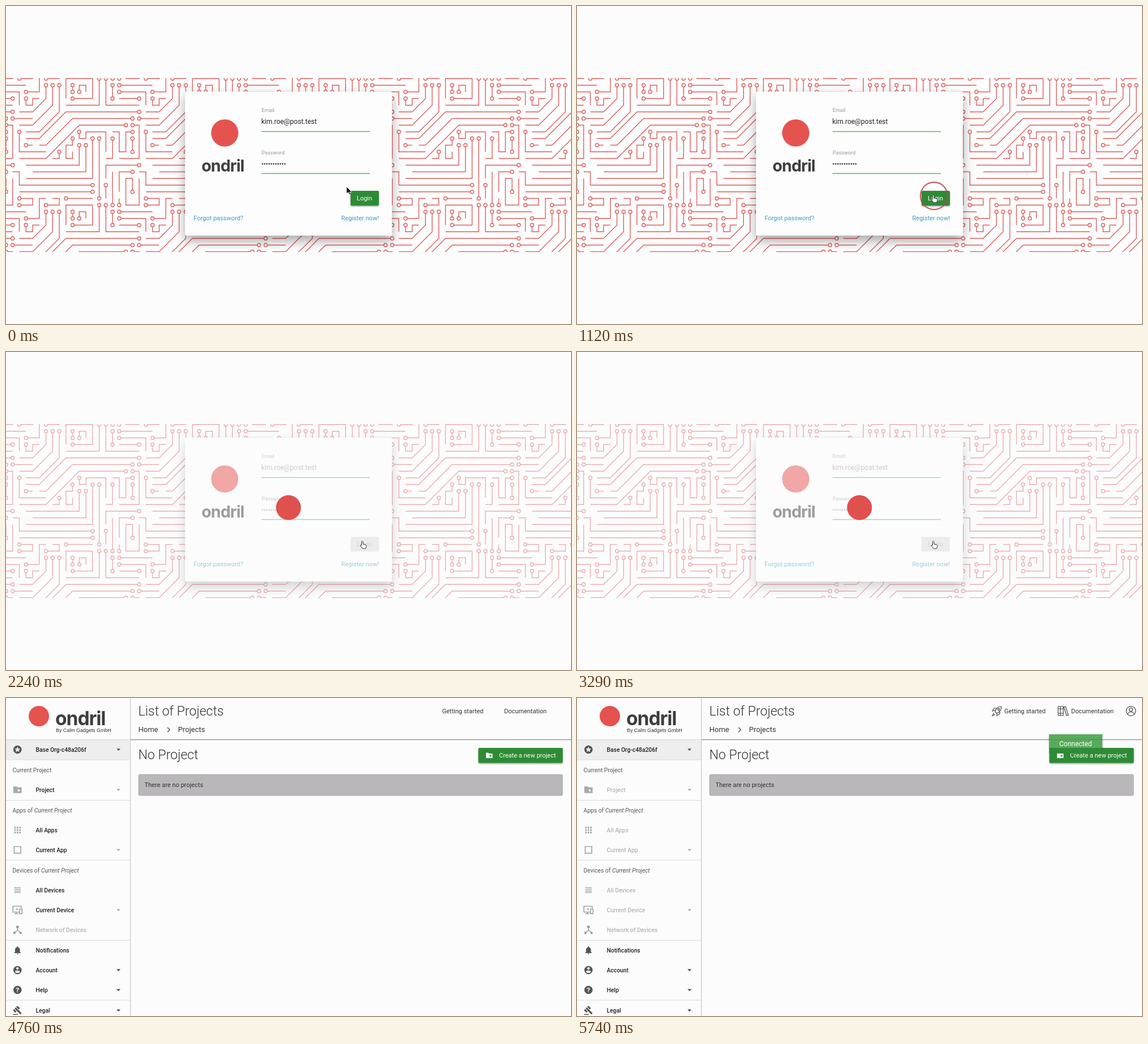
Write an HTML page that moves like this. It is 997 px wide and 561 px high and loops after 5880 ms.

```html
<!DOCTYPE html>
<html lang="en">
<head>
<meta charset="utf-8">
<title>Login and project list</title>
<style>
html, body { margin: 0; width: 100%; height: 100%; overflow: hidden; background: #fcfcfd; }
svg { display: block; width: 100%; height: 100%; }
text { font-family: Roboto, sans-serif; font-size: 11px; fill: #333; }
.word { font-family: Inter, sans-serif; font-size: 28.5px; font-weight: 700; fill: #3d3d3f; letter-spacing: -.03em; }
.word.big { font-size: 33.5px; }
.label { font-size: 9.2px; fill: #999; }
.link { fill: #3f9ac4; }
.title { font-size: 23px; font-weight: 300; }
.crumb { font-size: 13px; }
.menu { font-size: 10.3px; font-weight: 500; fill: #222; }
.section { font-size: 10.3px; fill: #555; }
.off { fill: #b5b5b5; }

.login, .dash, .cursor, .arrow, .hand, .ring, .veil, .field, .enabled, .disabled,
.fade, .early, .late, .toast { animation: 5880ms linear infinite both; }
.login { animation-name: login; }
.dash { animation-name: dash; }
.cursor { animation-name: move; }
.arrow { animation-name: arrow; }
.hand { animation-name: hand; }
.ring { animation-name: ring; }
.veil { animation-name: veil; }
.field { animation-name: field; }
.enabled { animation-name: enabled; }
.disabled { animation-name: disabled; }
.fade { animation-name: fade; }
.early { animation-name: early; }
.late { animation-name: late; }
.toast { animation-name: toast; }

@keyframes login { 0%, 80.94% { visibility: visible } 80.95%, 100% { visibility: hidden } }
@keyframes dash { 0%, 80.94% { visibility: hidden } 80.95%, 100% { visibility: visible } }
@keyframes move {
  0% { transform: translate(601px, 320px); animation-timing-function: ease-in-out }
  14.29%, 100% { transform: translate(629px, 334px) }
}
@keyframes arrow { 0%, 6.2% { opacity: 1 } 6.21%, 100% { opacity: 0 } }
@keyframes hand { 0%, 6.2% { opacity: 0 } 6.21%, 100% { opacity: 1 } }
@keyframes ring {
  0%, 16.6% { r: 12px; opacity: 0 }
  16.67% { r: 12px; opacity: .9 }
  19.05% { r: 24px; opacity: .85 }
  21.43%, 100% { r: 29px; opacity: 0 }
}
@keyframes field { 0%, 23.2% { fill: #222 } 25%, 100% { fill: #999 } }
@keyframes enabled { 0%, 23.2% { opacity: 1 } 25%, 100% { opacity: 0 } }
@keyframes disabled { 0%, 23.2% { opacity: 0 } 25%, 100% { opacity: 1 } }
@keyframes veil { 0%, 34% { opacity: 0 } 37.5%, 100% { opacity: 1 } }
@keyframes fade { 0%, 82.14% { fill: #222 } 86.9%, 100% { fill: #b5b5b5 } }
@keyframes early { 0%, 91.66% { opacity: 1 } 91.67%, 100% { opacity: 0 } }
@keyframes late { 0%, 91.66% { opacity: 0 } 91.67%, 100% { opacity: 1 } }
@keyframes toast { 0%, 95.2% { opacity: 0 } 97.62%, 100% { opacity: .88 } }
</style>
</head>
<body>
<svg viewBox="0 0 997 561" preserveAspectRatio="none">
  <defs>
    <clipPath id="band"><rect y="127" width="997" height="307"/></clipPath>
    <marker id="pad" viewBox="-5 -5 10 10" markerWidth="10" markerHeight="10" markerUnits="userSpaceOnUse"
      style="overflow:visible"><circle r="3" fill="#fefdfd" stroke="#d9605f" stroke-width="1.4"/></marker>
    <filter id="cardShadow" x="-20%" y="-20%" width="140%" height="150%">
      <feDropShadow dx="0" dy="9" stdDeviation="10" flood-opacity=".34"/>
    </filter>
    <filter id="soft" x="-10%" y="-20%" width="120%" height="160%">
      <feDropShadow dx="0" dy="1.5" stdDeviation="1.2" flood-opacity=".4"/>
    </filter>
    <g id="tile" fill="none" stroke="#d9605f" stroke-width="1.4"></g>
  </defs>

  <g class="login">
    <rect width="997" height="561" fill="#fcfcfd"/>
    <g clip-path="url(#band)"><rect y="127" width="997" height="307" fill="#fefdfd"/><g id="board"></g></g>
    <rect x="316" y="151" width="365" height="254" rx="2" fill="#fdfdfd" filter="url(#cardShadow)"/>
    <circle cx="386" cy="224" r="24" fill="#e5534f"/>
    <text class="word" x="345" y="292">ondril</text>
    <text class="label" x="451" y="187">Email</text>
    <text class="field" x="450.5" y="208" style="font-size:12px">kim.roe@post.test</text>
    <text class="label" x="451" y="261.5">Password</text>
    <g id="dots" class="field"></g>
    <path d="M451 221.5h191M451 295.5h191" stroke="#4fbd5a" stroke-width="1.7"/>
    <g class="disabled">
      <rect x="608" y="326" width="50" height="26" rx="2" fill="#dcdcdc"/>
      <text x="619" y="343" style="fill:#aaa">Login</text>
    </g>
    <g class="enabled">
      <rect x="608" y="326" width="50" height="26" rx="2" fill="#2e8b35" filter="url(#soft)"/>
      <text x="619" y="343" style="fill:#fff">Login</text>
    </g>
    <text class="link" x="331" y="378">Forgot password?</text>
    <text class="link" x="658" y="378" text-anchor="end">Register now!</text>
    <g class="veil">
      <rect width="997" height="561" fill="#fcfcfd" opacity=".5"/>
      <circle cx="498.5" cy="274.5" r="22" fill="#e0504e"/>
    </g>
    <circle class="ring" cx="630" cy="335" r="24" fill="none" stroke="#b9474a" stroke-width="2.2"/>
    <g class="cursor">
      <path class="arrow" d="M0-1V11L3 8.5 5 13 7 12 5 8H9Z" fill="#111" stroke="#fff" stroke-width=".6"/>
      <path class="hand" d="M-1.5 1c0-2 2.5-2 2.5 0v4l4 .8c1.6.4 2 1.2 1.7 3l-.9 4H.2L-3.5 8c-.8-1.5.6-2 2-.7z"
        fill="#fff" stroke="#333" stroke-width="1"/>
    </g>
  </g>

  <g class="dash">
    <rect width="997" height="561" fill="#fcfcfd"/>
    <rect y="73" width="219" height="36" fill="#eeeeef"/>
    <path d="M0 73.5H219M0 109H219M0 180.5H219M0 286H219M0 427.5H219M0 533H219" stroke="#dadada"/>
    <path d="M219.5 0V561" stroke="#d0d0d0" stroke-width="1.5"/>
    <path d="M220 73.5H997" stroke="#999" stroke-width="1.6"/>
    <circle cx="58" cy="32" r="18" fill="#e5534f"/>
    <text class="word big" x="87" y="48">ondril</text>
    <text x="88" y="59.5" style="font:8.9px 'Liberation Sans',sans-serif">By Calm Gadgets GmbH</text>
    <g id="menu"></g>
    <text class="section" x="11.5" y="131">Current Project</text>
    <text class="section" x="11.5" y="202">Apps of <tspan font-style="italic">Current Project</tspan></text>
    <text class="section" x="11.5" y="307.5">Devices of <tspan font-style="italic">Current Project</tspan></text>

    <text class="title" x="233.5" y="31">List of Projects</text>
    <text class="crumb" x="233.5" y="59.5">Home</text>
    <path d="M285 52l4 4-4 4" fill="none" stroke="#444" stroke-width="1.3"/>
    <text class="crumb" x="303.5" y="59.5">Projects</text>
    <g class="early">
      <text x="769.5" y="27">Getting started</text>
      <text x="879" y="27">Documentation</text>
    </g>
    <g class="late">
      <g fill="none" stroke="#444" stroke-width="1.2">
        <path d="M738 24c1-6 5-9 11-9 0 6-3 10-9 12zM738 22l-5 1 3-5 4 0M741 26l0 5 5-3 0-4M736 26l-3 5 5-2"/>
        <circle cx="744" cy="20" r="1.7"/>
        <path d="M849 15h4v16h-4zM853 15h5v16h-5zM859 16l3-1 5 15-3 1zM849 19h9M849 27h9"/>
        <circle cx="977.5" cy="23" r="8.3"/><circle cx="977.5" cy="20.5" r="3"/>
        <path d="M971.5 28.5c2-5 10-5 12 0"/>
      </g>
      <text x="754" y="27">Getting started</text>
      <text x="872" y="27">Documentation</text>
    </g>
    <text class="title" x="233.5" y="108">No Project</text>
    <rect x="833.5" y="88" width="149" height="26.5" rx="2" fill="#2e8b35" filter="url(#soft)"/>
    <path d="M847 96.5h4l1.5 1.5h6v8h-11.5z" fill="#fff"/>
    <path d="M855 99.8v4M853 101.8h4" stroke="#2e8b35" stroke-width="1.2"/>
    <text x="870" y="104.5" style="fill:#fff">Create a new project</text>
    <rect x="234" y="135" width="748" height="37" rx="2" fill="#b9b7b9" stroke="#aaa8aa"/>
    <text x="244.5" y="157">There are no projects</text>
    <g class="toast">
      <path d="M833 64h94v24h-94z" fill="#43a047" filter="url(#soft)"/>
      <path d="M833 88h94v10h-94z" fill="#2f8d37"/>
      <text x="851" y="84.5" style="font-size:12px;fill:#fff">Connected</text>
    </g>
  </g>
</svg>
<script>
const $ = id => document.getElementById(id);
const span = n => [...Array(n).keys()];

// The main circuit traces on a wrapping grid; each begins at a round pad.
const size = 19, pitch = 11.75, side = size * pitch;
const traces = `M6 1v2l-2 2h-2|M7 1v3l-3 3h-2|M8 1v4l-3 3h-2|M10 3h3v-3h-4v3|M11 2v-1h1v1
|M20 5h-11l-4 4h-2|M19 6h-9l-4 4h-1|M18 7h-7l-5 5h-4|M11 10v3h-8|M12 10v4h-8|M13 9v6h-10
|M13 16h-11v-2h-1|M13 17h-11|M19 17v-2h-1v4h2v-4|M1 13h-5v2|M0 14h-2v3
|M17 2h4v2|M17 1h5|M20 3h-3|M3 2h2v-3h1`.split('|').map(trace => trace.trim());

const used = new Set();
const key = (x, y) => (x + size) % size + ',' + (y + size) % size;
const drawTrace = (d, endPad) => {
  const path = d.replace(/-?\d+/g, n => n * pitch);
  return `<path d="${path}" marker-start="url(#pad)"${endPad ? ' marker-end="url(#pad)"' : ''}/>`;
};

function occupy(trace) {
  let x = 0, y = 0;
  for (const [, command, a, b] of trace.matchAll(/([Mhvl])(-?\d+)(?: (\d+))?/g)) {
    const dx = command === 'v' ? 0 : +a;
    const dy = command === 'v' ? +a : +(b || 0);
    const steps = command === 'M' ? 1 : Math.max(Math.abs(dx), Math.abs(dy));
    for (let i = 0; i < steps; i++) {
      x += dx / steps;
      y += dy / steps;
      used.add(key(x, y));
    }
  }
}

let seed = 7;
const random = () => (seed = (seed * 16807) % 2147483647) / 2147483647;
const headings = [[1, 0], [0, 1], [-1, 0], [0, -1]];

// Fill the free grid points with short traces that prefer to run straight.
function grow(x, y) {
  if (used.has(key(x, y))) return '';
  used.add(key(x, y));
  let d = `M${x} ${y}`, heading = Math.floor(random() * 4), length = 0;
  while (length < 9) {
    const side = random() < .5 ? 1 : 3;
    const order = random() < .2 ? [side, 0, 4 - side, 2] : [0, side, 4 - side, 2];
    const turn = order.find(t => {
      const [dx, dy] = headings[(heading + t) % 4];
      return !used.has(key(x + dx, y + dy));
    });
    if (turn === undefined) break;
    heading = (heading + turn) % 4;
    const [dx, dy] = headings[heading];
    x += dx;
    y += dy;
    used.add(key(x, y));
    d += dx ? `h${dx}` : `v${dy}`;
    length++;
  }
  return length ? drawTrace(d, random() < .35) : '';
}

traces.forEach(occupy);
$('tile').innerHTML = traces.map(trace => drawTrace(trace)).join('') +
  span(size * size).map(i => grow(i % size, Math.floor(i / size))).join('');
$('board').innerHTML = span(21).map(i =>
  `<use href="#tile" x="${(i % 7 - 1) * side}" y="${128 + (Math.floor(i / 7) - 1) * side}"/>`).join('');

$('dots').innerHTML = span(11).map(i => `<circle cx="${452.5 + i * 3.95}" cy="278.5" r="1.25"/>`).join('');

const disc = 'M12 2a10 10 0 1 0 .01 0z';
const star = 'M12 5l2 4.5 5 .5-3.8 3.2L16.3 18 12 15.5 7.7 18l1.1-4.8L5 10l5-.5z';
const solid = (d, color = '#555') => `<path d="${d}" fill="${color}" fill-rule="evenodd"/>`;
const line = (d, color = '#999') => `<path d="${d}" fill="none" stroke="${color}" stroke-width="2"/>`;
const icons = {
  org: solid(disc + star),
  folder: solid('M2 4h8l2 2h10v14H2zM15 9l-1 3h-3l2.5 2-1 3 2.5-2 2.5 2-1-3 2.5-2h-3z', '#aaa'),
  apps: span(9).map(i => solid(`M${4 + i % 3 * 6} ${4 + Math.floor(i / 3) * 6}h4v4h-4z`, '#aaa')).join(''),
  box: line('M4 4h16v16H4z'),
  list: line('M4 6h16M4 10h16M4 14h16M4 18h16', '#aaa'),
  device: line('M16 17H1V3h20v5M9 17v4M5 21h9M17 10h6v11h-6zM11 8v4M9 10h4'),
  net: line('M12 6v7l-7 6M12 13l7 6') + solid('M9 2h6v6H9zM2 17h5v5H2zM17 17h5v5h-5z', '#999'),
  bell: solid('M12 22a2 2 0 0 0 2-2h-4a2 2 0 0 0 2 2zM18 16v-5c0-3-1.6-5.6-4.5-6.3V4a1.5 1.5 0 0 0-3 0v.7C7.6 5.4 6 8 6 11v5l-2 2v1h16v-1z'),
  user: solid(disc + 'M12 5a3 3 0 1 1-.01 0zM6 16c0-4 12-4 12 0-3 4-9 4-12 0z'),
  help: solid(disc) + '<text x="12" y="17.5" text-anchor="middle" style="font-size:16px;font-weight:700;fill:#fff">?</text>',
  legal: solid('M1 21h12v2H1zM5 8l3-3 14 14-3 3zM12 1l6 6-3 3-6-6zM4 9l6 6-3 3-6-6z')
};

const rows = [
  [91, 'org', 'Base Org-c48a206f', '', 1],
  [162, 'folder', 'Project', 'fade', 1],
  [233, 'apps', 'All Apps', 'fade', 0],
  [268, 'box', 'Current App', 'fade', 1],
  [339, 'list', 'All Devices', 'fade', 0],
  [374, 'device', 'Current Device', 'fade', 1],
  [409, 'net', 'Network of Devices', 'off', 0],
  [445, 'bell', 'Notifications', '', 0],
  [480, 'user', 'Account', '', 1],
  [515, 'help', 'Help', '', 1],
  [551, 'legal', 'Legal', '', 1]
];
$('menu').innerHTML = rows.map(([y, icon, label, state, drop]) => `
  <g transform="translate(11.5 ${y - 8.8}) scale(.73)">${icons[icon]}</g>
  <text class="menu ${state}" x="52.5" y="${y + 3.7}">${label}</text>
  ${drop ? `<path d="M195 ${y - 1.5}h7l-3.5 3.5z" fill="${state ? '#aaa' : '#444'}"/>` : ''}`).join('');
</script>
</body>
</html>
```
